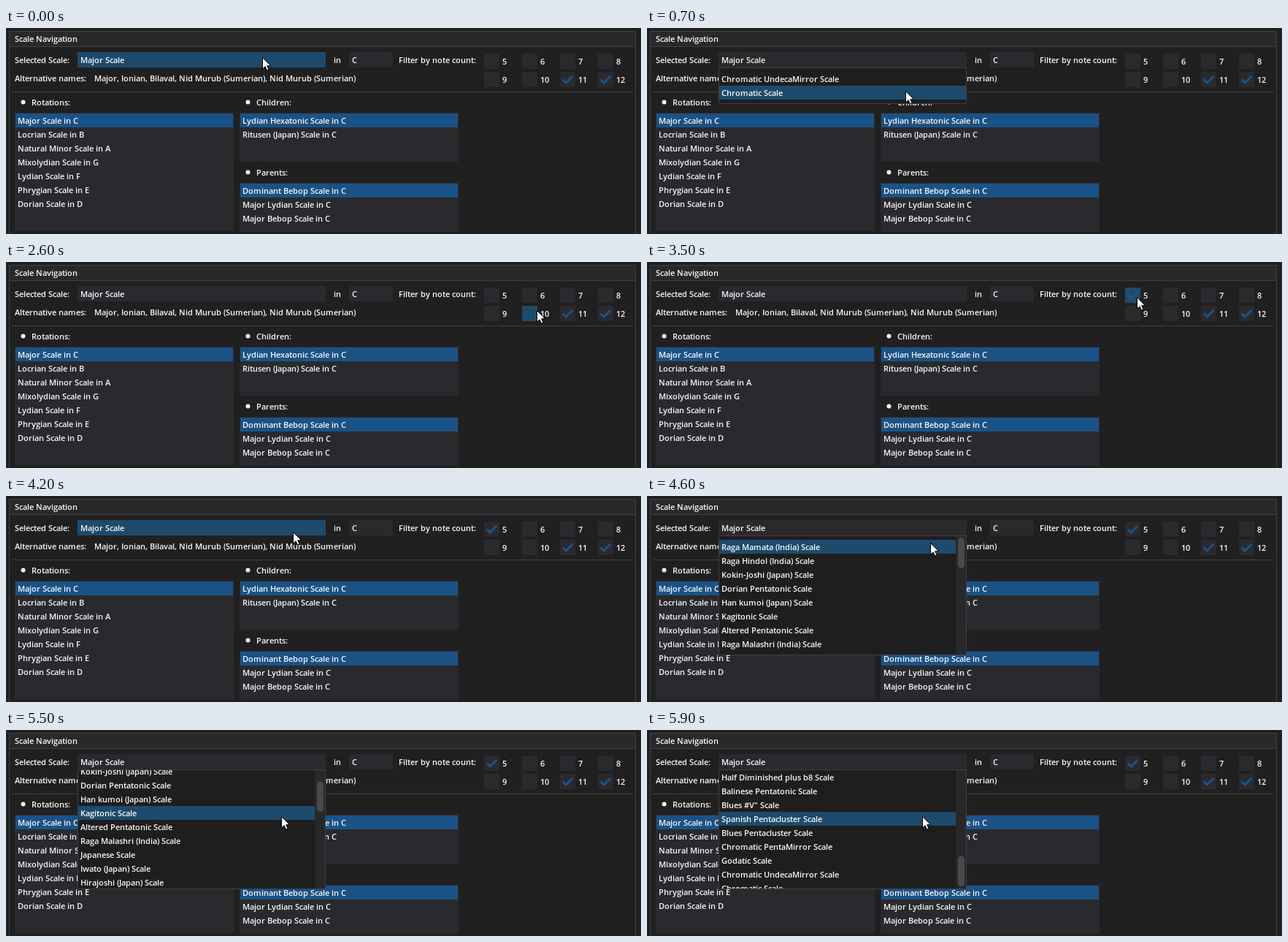
Animation of 870 by 282 pixels, one loop 6 s. Source, as an HTML page with a canvas:

```html
<!DOCTYPE html>
<html lang="en">
<head>
<meta charset="utf-8">
<title>Scale Navigation</title>
<style>
  html, body { margin: 0; width: 100%; height: 100%; overflow: hidden; background: #202020; }
  canvas { display: block; }
</style>
</head>
<body>
<canvas id="stage" width="870" height="282"></canvas>
<script>
const ctx = document.getElementById('stage').getContext('2d');
const LOOP = 6000, STEP = 100;
const ROW = 19, POPUP_TOP = 54, PAD = 8;
const COLOR = {
  bg: '#202020', popup: '#1e1e1e', title: '#29292c', frame: '#2a2a2e', border: '#404043',
  header: '#1b5286', hover: '#1e4a6c', mark: '#1b558a', track: '#28282b', grab: '#4a4a4c', text: '#f8f8f8'
};

const rotations = ['Major Scale in C', 'Locrian Scale in B', 'Natural Minor Scale in A',
  'Mixolydian Scale in G', 'Lydian Scale in F', 'Phrygian Scale in E', 'Dorian Scale in D'];
const children = ['Lydian Hexatonic Scale in C', 'Ritusen (Japan) Scale in C'];
const parents = ['Dominant Bebop Scale in C', 'Major Lydian Scale in C', 'Major Bebop Scale in C'];
const largeScales = ['Chromatic UndecaMirror', 'Chromatic'];
const allScales = ['Raga Mamata (India)', 'Raga Hindol (India)', 'Kokin-Joshi (Japan)',
  'Dorian Pentatonic', 'Han kumoi (Japan)', 'Kagitonic', 'Altered Pentatonic',
  'Raga Malashri (India)', 'Japanese', 'Iwato (Japan)', 'Hirajoshi (Japan)', 'Kumoi (Japan)',
  'Pelog (Bali)', 'Major Pentatonic', 'Minor Pentatonic', 'Ritusen (Japan)', 'Egyptian',
  'Raga Deshgaur (India)', 'Raga Hamsadhvani (India)', 'Dominant Pentatonic', 'Chinese',
  'Insen (Japan)', 'Raga Chandrakauns (India)', 'Half Diminished plus b8',
  'Balinese Pentatonic', 'Blues #V"', 'Spanish Pentacluster', 'Blues Pentacluster',
  'Chromatic PentaMirror', 'Godatic', ...largeScales];

// Rows of [time, values...]
const cursorPath = [
  [0, 351, 40], [300, 351, 40], [700, 354, 86], [1300, 354, 86], [1600, 376, 48],
  [1700, 378, 46], [2000, 717, 105], [2300, 729, 70], [2500, 729, 70], [2600, 727, 66],
  [2900, 727, 66], [3400, 671, 48], [3600, 671, 48], [4200, 393, 49], [4300, 393, 47],
  [4400, 393, 47], [4700, 386, 72], [4800, 386, 72], [5000, 380, 91], [5200, 377, 118]
];
const scrollPath = [[5400, 0], [5500, 51], [5900, 442]];

function sample(path, t) {
  const next = path.findIndex(k => k[0] > t);
  if (next === 0) return path[0].slice(1);
  if (next < 0) return path[path.length - 1].slice(1);
  const a = path[next - 1], b = path[next];
  const u = (t - a[0]) / (b[0] - a[0]);
  return a.slice(1).map((v, i) => v + (b[i + 1] - v) * u);
}

const inside = (p, x, y, w, h) => p[0] >= x && p[0] < x + w && p[1] >= y && p[1] < y + h;

function rect(x, y, w, h, color) {
  ctx.fillStyle = color;
  ctx.fillRect(x, y, w, h);
}

function outline(x, y, w, h) {
  ctx.strokeStyle = COLOR.border;
  ctx.lineWidth = 1;
  ctx.strokeRect(x + 0.5, y + 0.5, w - 1, h - 1);
}

// Glyph advances snap to whole pixels
const advances = {};
function text(str, x, top) {
  ctx.fillStyle = COLOR.text;
  for (const ch of str) {
    advances[ch] ??= Math.round(ctx.measureText(ch).width);
    ctx.fillText(ch, x, top + 12);
    x += advances[ch];
  }
}

function combo(label, x, w, hovered) {
  rect(x, 33, w, 21, hovered ? COLOR.hover : COLOR.frame);
  text(label, x + 4, 36);
}

function checkbox(n, x, y, checked, hovered) {
  rect(x, y, 21, 21, hovered ? COLOR.hover : COLOR.frame);
  if (checked) {
    ctx.strokeStyle = COLOR.mark;
    ctx.lineWidth = 3;
    ctx.beginPath();
    ctx.moveTo(x + 3.75, y + 10.5);
    ctx.lineTo(x + 8.25, y + 15);
    ctx.lineTo(x + 17.25, y + 6);
    ctx.stroke();
  }
  text(String(n), x + 25, y + 3);
}

function list(title, items, x, y, h) {
  ctx.fillStyle = COLOR.text;
  ctx.beginPath();
  ctx.arc(x + 11.5, y + 10.5, 3, 0, Math.PI * 2);
  ctx.fill();
  text(title, x + 23, y + 3);
  rect(x, y + 25, 300, h, COLOR.frame);
  rect(x + 1, y + 26, 298, ROW, COLOR.header);
  items.forEach((s, i) => text(s, x + 4, y + 28 + i * ROW));
}

function popup(items, scroll, p) {
  const x = 98, w = 340;
  const content = items.length * ROW - 4 + PAD * 2;
  const h = Math.min(content, 164);
  const scrolls = content > h;
  const rowW = w - (scrolls ? 16 : 2);
  rect(x, POPUP_TOP, w, h, COLOR.popup);
  ctx.save();
  ctx.beginPath();
  ctx.rect(x + 1, POPUP_TOP + 1, rowW, h - 2);
  ctx.clip();
  items.forEach((name, i) => {
    const y = Math.round(POPUP_TOP + PAD + i * ROW - scroll);
    if (y < POPUP_TOP - ROW || y > POPUP_TOP + h + ROW) return;
    if (inside(p, x, y - 2, rowW, ROW)) rect(x + 1, y - 2, rowW, ROW, COLOR.hover);
    text(name + ' Scale', x + 4, y);
  });
  ctx.restore();
  if (scrolls) {
    const trackH = h - 2, grabH = trackH * h / content;
    const grabY = POPUP_TOP + 1 + (trackH - grabH) * scroll / (content - h);
    rect(x + w - 15, POPUP_TOP + 1, 14, trackH, COLOR.track);
    ctx.fillStyle = COLOR.grab;
    ctx.beginPath();
    ctx.roundRect(x + w - 12, grabY + 2, 9, grabH - 1, 4.5);
    ctx.fill();
  }
  outline(x, POPUP_TOP, w, h);
}

function pointer(x, y) {
  ctx.save();
  ctx.translate(x + 0.5, y + 0.5);
  ctx.beginPath();
  ctx.moveTo(0, 0);
  for (const [px, py] of [[0, 15.5], [3.6, 12.2], [6, 17.6], [8.6, 16.5], [6.2, 11.2], [11, 11.2]]) {
    ctx.lineTo(px, py);
  }
  ctx.closePath();
  ctx.fillStyle = '#fff';
  ctx.fill();
  ctx.strokeStyle = '#000';
  ctx.lineWidth = 1;
  ctx.stroke();
  ctx.restore();
}

function draw(t) {
  const p = sample(cursorPath, t).map(Math.round);
  const fiveOn = t >= 3500;
  const open = (t >= 300 && t < 1600) || t >= 4400;
  const over = (x, y, w, h) => !open && inside(p, x, y, w, h);

  ctx.font = '600 11.014px "Open Sans", "Noto Sans", sans-serif';
  rect(0, 0, 870, 282, COLOR.bg);
  rect(4, 4, 859, 21, COLOR.title);
  outline(4, 4, 859, 300);
  rect(5, 25, 857, 1, COLOR.border);
  text('Scale Navigation', 12, 7);

  text('Selected Scale:', 12, 36);
  combo('Major Scale', 98, 340, over(98, 33, 340, 21));
  text('in', 449, 36);
  combo('C', 470, 60, over(470, 33, 60, 21));
  text('Filter by note count:', 538, 36);
  for (let n = 5; n <= 12; n++) {
    const x = 655 + (n - 5) % 4 * 52, y = n < 9 ? 35 : 60;
    checkbox(n, x, y, n > 10 || (n === 5 && fiveOn), over(x, y, 38, 21));
  }
  text('Alternative names:', 12, 61);
  text('Major, Ionian, Bilaval, Nid Murub (Sumerian), Nid Murub (Sumerian)', 121, 61);
  rect(8, 87, 851, 1, COLOR.border);

  list('Rotations:', rotations, 12, 91, 162);
  list('Children:', children, 320, 91, 67);
  list('Parents:', parents, 320, 187, 67);

  if (open) popup(fiveOn ? allScales : largeScales, sample(scrollPath, t)[0], p);
  pointer(p[0], p[1]);
}

const start = performance.now();
function tick() {
  const t = (performance.now() - start) % LOOP;
  draw(Math.floor(t / STEP) * STEP);
  requestAnimationFrame(tick);
}
tick();
</script>
</body>
</html>
```
